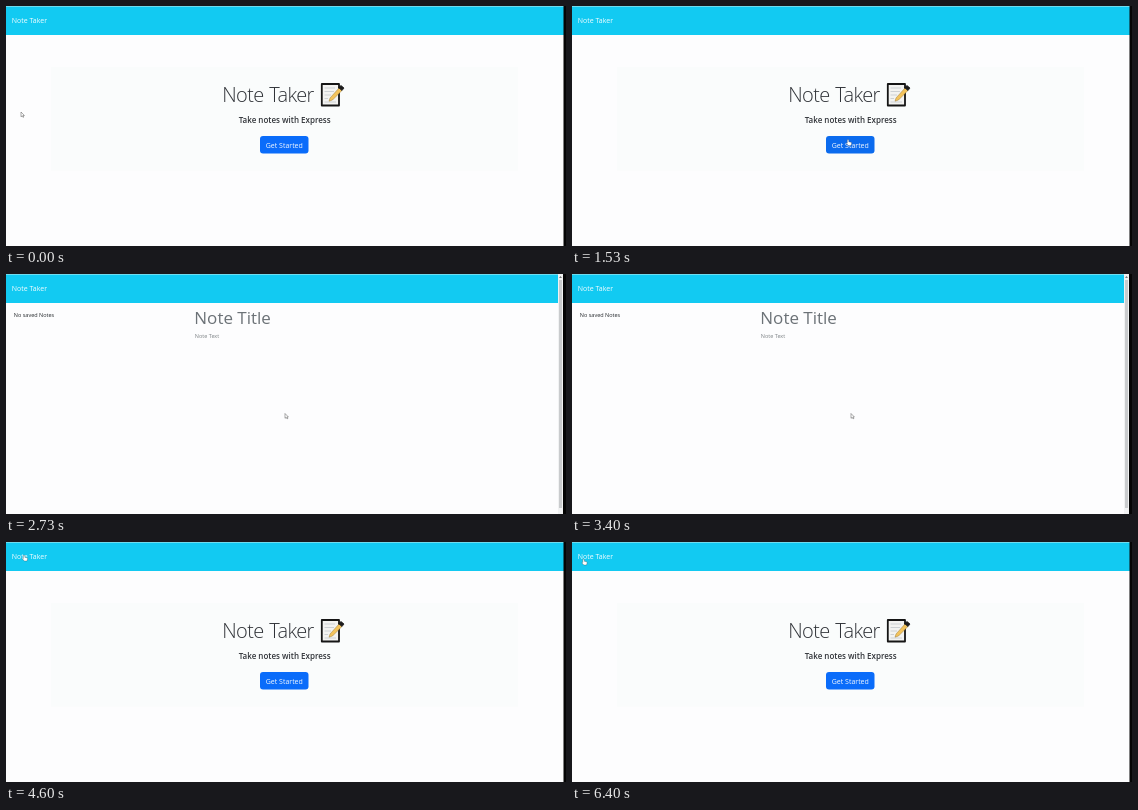
Animation, 560 px wide and 240 px high, one loop 6.47 s. Source, as an HTML page:

```html
<!DOCTYPE html>
<html lang="en">
<head>
<meta charset="utf-8">
<title>Note Taker</title>
<style>
  html, body { margin: 0; width: 100%; height: 100%; overflow: hidden; background: #fdfdfe; }
  svg { display: block; width: 560px; height: 240px; font-family: "Open Sans", "Noto Sans", sans-serif; }
</style>
</head>
<body>
<svg viewBox="0 0 560 240">
  <rect width="560" height="240" fill="#fdfdfe"/>
  <rect width="558" height="29" fill="#12caf2"/>
  <rect width="558" height="1" fill="#6edcef"/>
  <text x="5.8" y="17.4" font-size="7" fill="#f4fdff">Note Taker</text>

  <g id="home">
    <rect x="45" y="61" width="467" height="103.5" fill="#fafcfc"/>
    <text x="216.2" y="96" font-size="20" font-weight="300" letter-spacing="-.6" word-spacing="1" fill="#303338">Note Taker</text>
    <g stroke-linejoin="round">
      <path d="M315.8 78H333V99.5H315.8Z" fill="#f3f3f1" stroke="#151515" stroke-width="1.8"/>
      <path d="M318.5 82H329M318.5 85.5H328M318.5 89H325M318.5 92.5H322M318.5 96H330" stroke="#c3c8cc" stroke-width=".8"/>
      <path d="M333 82L336 84.5L326.5 94L323 95.2L324 92Z" fill="#f3c35c" stroke="#8a6a2a" stroke-width=".4"/>
      <path d="M332.5 81.5L335 79.5L338 82L336 84.5Z" fill="#1c1c1c" stroke="#1c1c1c" stroke-width=".8"/>
    </g>
    <text x="278.7" y="116.8" font-size="8" font-weight="600" text-anchor="middle" fill="#303338">Take notes with Express</text>
    <rect id="button" x="254" y="130" width="48.5" height="17.5" rx="3"/>
    <text x="278.3" y="141.5" font-size="7" text-anchor="middle" fill="#f4f9ff">Get Started</text>
  </g>

  <g id="notes">
    <text x="7.8" y="43" font-size="5.5" fill="#24282c">No saved Notes</text>
    <text x="188.3" y="50" font-size="17" fill="#6c7277">Note Title</text>
    <text x="188.8" y="64" font-size="5.5" fill="#7b8084">Note Text</text>
    <rect x="552" width="5" height="240" fill="#f1f2f3"/>
    <path d="M553 4L554.5 2L556 4Z" fill="#777"/>
    <rect x="553" y="6" width="3" height="228" fill="#c9cbcd"/>
    <rect x="557" width="1" height="240" fill="#050505"/>
  </g>

  <rect x="557.5" width="2.5" height="240" fill="#050505"/>
  <path id="arrow" d="M0 0V4.8L1.2 3.8L2 5.4L2.8 5L2 3.5H3.4Z" fill="#fff" stroke="#555" stroke-width=".5"/>
  <path id="hand" d="M1 0Q1.8 0 1.8 1V2.3L4 2.8Q4.8 3 4.6 4L4 6H1.3L-.7 3.8Q-.3 3 .3 3.7V1Q.3 0 1 0Z" fill="#fff" stroke="#333" stroke-width=".3"/>
</svg>
<script>
const LOOP = 6470, STEP = 200 / 3;
const OPEN_NOTES = 1710, GO_HOME = 4310;
// Cursor stops: time, x, y
const stops = [
  [0, 15, 106], [930, 275, 133.5], [1600, 275, 133.5],
  [1900, 279, 139.5], [3400, 279, 139.5], [4200, 17, 13],
  [5930, 17, 13], [6400, 10.5, 17], [LOOP, 10.5, 17]
];
const $ = id => document.getElementById(id);
const show = (id, on) => $(id).setAttribute("visibility", on ? "visible" : "hidden");

function cursorAt(t) {
  const i = stops.findIndex(s => s[0] > t);
  const [t0, x0, y0] = stops[i - 1], [t1, x1, y1] = stops[i];
  const p = (t - t0) / (t1 - t0), e = p * p * (3 - 2 * p);
  return [x0 + (x1 - x0) * e, y0 + (y1 - y0) * e];
}

function draw(now) {
  const t = Math.floor((now % LOOP) / STEP + 0.05) * STEP;
  const onNotes = t >= OPEN_NOTES && t < GO_HOME;
  const [x, y] = cursorAt(Math.min(t, LOOP - 1));
  const onButton = !onNotes && x > 253 && x < 302 && y > 130 && y < 147;
  const onLink = onButton || (x > 5 && x < 42 && y < 22);
  show("home", !onNotes);
  show("notes", onNotes);
  show("arrow", !onLink);
  show("hand", onLink);
  $("button").setAttribute("fill", onButton ? "#0b6bee" : "#0a6cfa");
  for (const id of ["arrow", "hand"]) $(id).setAttribute("transform", `translate(${x} ${y})`);
}

const start = performance.now();
function tick() {
  draw(performance.now() - start);
  requestAnimationFrame(tick);
}
tick();
</script>
</body>
</html>
```
